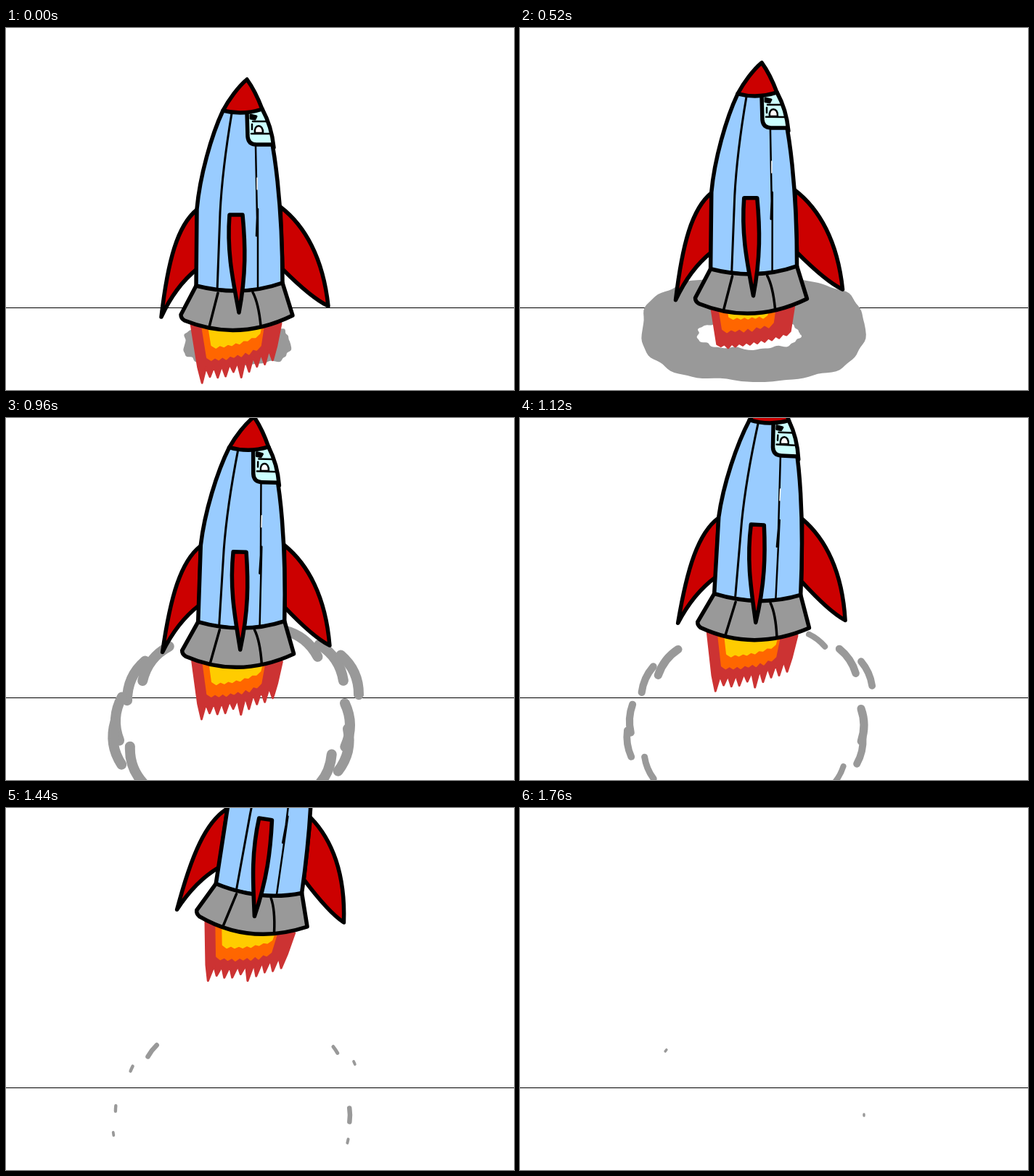
Animation, 700 px wide and 500 px high, one loop 1920 ms. Source, as an HTML page with a canvas:

```html
<!DOCTYPE html>
<html lang="en">
<head>
<meta charset="utf-8">
<title>Rocket launch</title>
<style>
  html, body { margin: 0; width: 100%; height: 100%; overflow: hidden; background: #fff; }
  canvas { display: block; }
</style>
</head>
<body>
<canvas id="stage" width="700" height="500"></canvas>
<script>
const ctx = document.getElementById('stage').getContext('2d');
const LOOP = 1920, STEP = 40, LAST = 1760;
const RED = '#c00', BLUE = '#9cf', GRAY = '#999', BLACK = '#000';
const INK = 5.5;

const lerp = (a, b, k) => a + (b - a) * k;
const rand = i => Math.abs(Math.sin(i * 12.9898) * 43758.5453) % 1;

function draw(d, fill, width = 0, color = BLACK) {
  const path = new Path2D(d);
  if (fill) { ctx.fillStyle = fill; ctx.fill(path); }
  if (width) { ctx.lineWidth = width; ctx.strokeStyle = color; ctx.stroke(path); }
}

// Superellipse with a slightly lumpy edge.
function lumpy(cx, cy, rx, ry, power) {
  const bend = v => Math.sign(v) * Math.abs(v) ** (2 / power);
  for (let i = 0; i < 120; i++) {
    const a = i * Math.PI / 60;
    const lump = 1.5 * Math.sin(9 * a + 1) + Math.sin(17 * a);
    ctx.lineTo(cx + (rx + lump) * bend(Math.cos(a)), cy + (ry + lump) * bend(Math.sin(a)));
  }
  ctx.closePath();
}

// The cloud swells, then a hole opens and eats it up to a thin ring.
function cloud(t) {
  const k = t / 960, ease = 1 - (1 - k) ** 2, open = (t - 240) / 720;
  ctx.beginPath();
  lumpy(318 + 4 * ease, 437 - 27 * ease, 73 + 102 * ease, 27 + 93 * k ** 1.2, lerp(3.2, 2.1, k));
  if (open > 0) {
    ctx.moveTo(315 + 161 * open ** .87, lerp(432, 410, open));
    lumpy(315, lerp(432, 410, open), 161 * open ** .87, 107 * open ** 1.8, 2.4);
  }
  ctx.fillStyle = GRAY;
  ctx.fill('evenodd');
}

// A strip of the ring around (x, y) that shrinks over its life.
function wisp(t, x, y, life) {
  const left = 1 - Math.max(0, t - 960) / life;
  if (left <= 0) return;
  const fade = left ** 1.5, half = 30 * fade;
  const a = Math.atan2(y - 425, x - 318), nx = Math.cos(a), ny = Math.sin(a);
  const bulge = half * half / 130;
  const end = side => [x - side * ny * half - nx * bulge, y + side * nx * half - ny * bulge];
  draw(`M${end(-1)}Q${[x + nx * bulge, y + ny * bulge]} ${end(1)}`, null, 3 + 11 * fade, GRAY);
}

function wisps(t) {
  wisp(t, 201, 335, 920);
  wisp(t, 173, 360, 640);
  wisp(t, 151, 415, 640);
  wisp(t, 148, 450, 580);
  wisp(t, 176, 484, 480);
  wisp(t, 410, 306, 400);
  wisp(t, 454, 334, 700);
  wisp(t, 480, 352, 580);
  wisp(t, 474, 424, 900);
  wisp(t, 471, 460, 600);
  wisp(t, 440, 494, 400);
}

// One flame layer with ragged teeth along its lower edge.
function tongue(color, left, right, depth, slope, spike) {
  const x0 = left + depth * .16, x1 = right - depth * .1;
  const count = 2 * Math.round((right - left) / 12);
  let d = `M${left} 408`;
  for (let i = 0; i <= count; i++) {
    const s = i / count;
    const tooth = i % 2 ? spike * (.65 + .7 * rand(i + left)) : 0;
    d += `L${lerp(x0, x1, s)} ${408 + depth * (1 - slope * s * s) + tooth}`;
  }
  draw(d + `L${right} 408Z`, color, 3, color);
}

function flame(tall) {
  if (tall) {
    tongue('#c33', 255, 379, 61, .5, 17);
    tongue('#f60', 270, 355, 47, .35, 4);
    tongue('#fc0', 279, 352, 30, .55, 3);
  } else {
    tongue('#c33', 263, 377, 52, .35, 4);
    tongue('#f60', 274, 351, 31, .3, 4);
    tongue('#fc0', 286, 341, 14, .2, 3);
  }
}

function rocket() {
  // side fins
  draw('M263 251C236 273 223 322 214 399C225 375 242 350 263 333Z', RED, INK);
  draw('M378 247C412 273 437 318 444 384C425 375 402 354 381 333Z', RED, INK);
  // hull with seams
  draw('M299 114C283 148 267 205 263 250L262 357C298 366 348 366 381 353C381 260 372 150 353 112Z', BLUE, INK);
  draw('M311 118C304 160 297 215 295 255L291 364', null, 3);
  draw('M344 163L346 262 345 287M347 250V366', null, 2.5);
  draw('M346 207V223', null, 1.5, '#fff');
  // window and pilot
  draw('M332 116L352 114C362 130 366 145 367 161H345Q333 161 333 150Z', '#cff');
  draw('M332 116L333 150Q334 161 345 161H366', null, INK);
  draw('M337 120L345 122 343 126 337 125Z', BLACK, 3);
  draw('M340 129H359M338 146H363M339 133V140', null, 2.5);
  draw('M343 145C341 132 355 132 354 145Z', '#fff', 2.5);
  draw('M353 112C363 130 367 145 369 165', null, INK);
  // nose
  draw('M332 71C320 81 307 99 299 114Q326 121 353 112C347 96 340 82 332 71Z', RED, INK);
  // engine skirt
  draw('M262 356L241 396Q241 401 246 404Q320 434 395 397L381 352Q325 372 262 356Z', GRAY, INK);
  draw('M292 366L280 413M340 365Q348 380 351 411', null, 3.5);
  // front fin
  draw('M308 258H326C330 300 331 340 321 393C313 350 304 310 308 258Z', RED, INK);
}

function render(t) {
  const u = t / 1000;
  ctx.fillStyle = '#fff';
  ctx.fillRect(0, 0, 700, 500);
  ctx.fillStyle = BLACK;
  ctx.fillRect(0, 386, 700, 1);
  if (t < 900) cloud(t); else wisps(t);
  if (t >= LAST) return;

  const drift = u + 1.08 * u ** 8;
  const rise = 39 * u + 42 * u ** 4.1;
  const tilt = 1.7 * u ** 4.3;
  ctx.save();
  ctx.translate(321 + drift, 393 - rise);
  ctx.rotate(tilt * Math.PI / 180);
  ctx.translate(-321, -393);
  flame(t / STEP % 2 === 0);
  rocket();
  ctx.restore();
}

ctx.lineCap = ctx.lineJoin = 'round';
const start = performance.now();
function tick() {
  const t = (performance.now() - start) % LOOP;
  render(Math.min(LAST, Math.floor(t / STEP) * STEP));
  requestAnimationFrame(tick);
}
tick();
</script>
</body>
</html>
```
